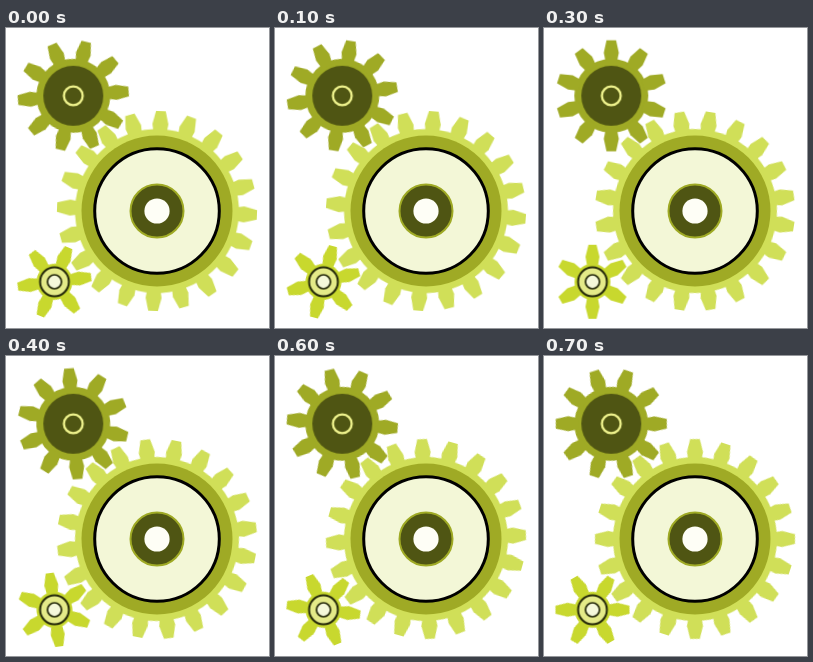
These frames come from a looping animation (263 by 300 pixels, 800 ms). An HTML page without scripts:

```html
<!DOCTYPE html>
<html lang="en">
<head>
<meta charset="utf-8">
<title>Gears</title>
<style>
  html, body { margin: 0; width: 100%; height: 100%; overflow: hidden; background: #fff; }
  svg { display: block; width: 100%; height: 100%; }
  /* each gear advances by one tooth pitch per loop */
  .spin { animation: turn .8s steps(8) infinite; }
  .large { --from: 2.25deg; --to: 20.25deg; fill: #d0df58; }
  .medium { --from: 13.5deg; --to: -22.5deg; fill: #9faa25; }
  .small { --from: 22.5deg; --to: -37.5deg; fill: #c8d82e; }
  @keyframes turn {
    from { transform: rotate(var(--from)); }
    to { transform: rotate(var(--to)); }
  }
</style>
</head>
<body>
<svg viewBox="0 0 263 300">
  <defs>
    <path id="tooth-l" d="M-4.8-100h9.6L8-87 6.5-78h-13L-8-87z"/>
    <path id="tooth-m" d="M-4.8-55.5h9.6L7.5-43 5.5-33h-11L-7.5-43z"/>
    <path id="tooth-s" d="M-4-37h8L7-25 5-14H-5L-7-25z"/>
    <g id="quarter">
      <use href="#tooth-l"/>
      <use href="#tooth-l" transform="rotate(18)"/>
      <use href="#tooth-l" transform="rotate(36)"/>
      <use href="#tooth-l" transform="rotate(54)"/>
      <use href="#tooth-l" transform="rotate(72)"/>
    </g>
    <g id="half-m">
      <use href="#tooth-m"/>
      <use href="#tooth-m" transform="rotate(36)"/>
      <use href="#tooth-m" transform="rotate(72)"/>
      <use href="#tooth-m" transform="rotate(108)"/>
      <use href="#tooth-m" transform="rotate(144)"/>
    </g>
    <g id="half-s">
      <use href="#tooth-s"/>
      <use href="#tooth-s" transform="rotate(60)"/>
      <use href="#tooth-s" transform="rotate(120)"/>
    </g>
  </defs>

  <g transform="translate(67.3 67.8)">
    <g class="spin medium">
      <circle r="37"/>
      <use href="#half-m"/>
      <use href="#half-m" transform="rotate(180)"/>
    </g>
    <circle r="30" fill="#4f5513"/>
    <circle r="9.4" fill="none" stroke="#f0f48e" stroke-width="2.3"/>
  </g>

  <g transform="translate(151 183)">
    <g class="spin large">
      <circle r="82"/>
      <use href="#quarter"/>
      <use href="#quarter" transform="rotate(90)"/>
      <use href="#quarter" transform="rotate(180)"/>
      <use href="#quarter" transform="rotate(270)"/>
    </g>
    <circle r="75.5" fill="#9faa25"/>
    <circle r="62.3" fill="#f3f7d7" stroke="#000" stroke-width="3"/>
    <circle r="26.5" fill="#4f5513" stroke="#9faa25" stroke-width="2"/>
    <circle r="12.6" fill="#fefef6"/>
  </g>

  <g transform="translate(48.5 253.8)">
    <g class="spin small">
      <circle r="18"/>
      <use href="#half-s"/>
      <use href="#half-s" transform="rotate(180)"/>
    </g>
    <circle r="14.4" fill="#e4ea88" stroke="#24280a" stroke-width="2"/>
    <circle r="7" fill="#f5f8da" stroke="#24280a" stroke-width="1.7"/>
  </g>
</svg>
</body>
</html>
```
